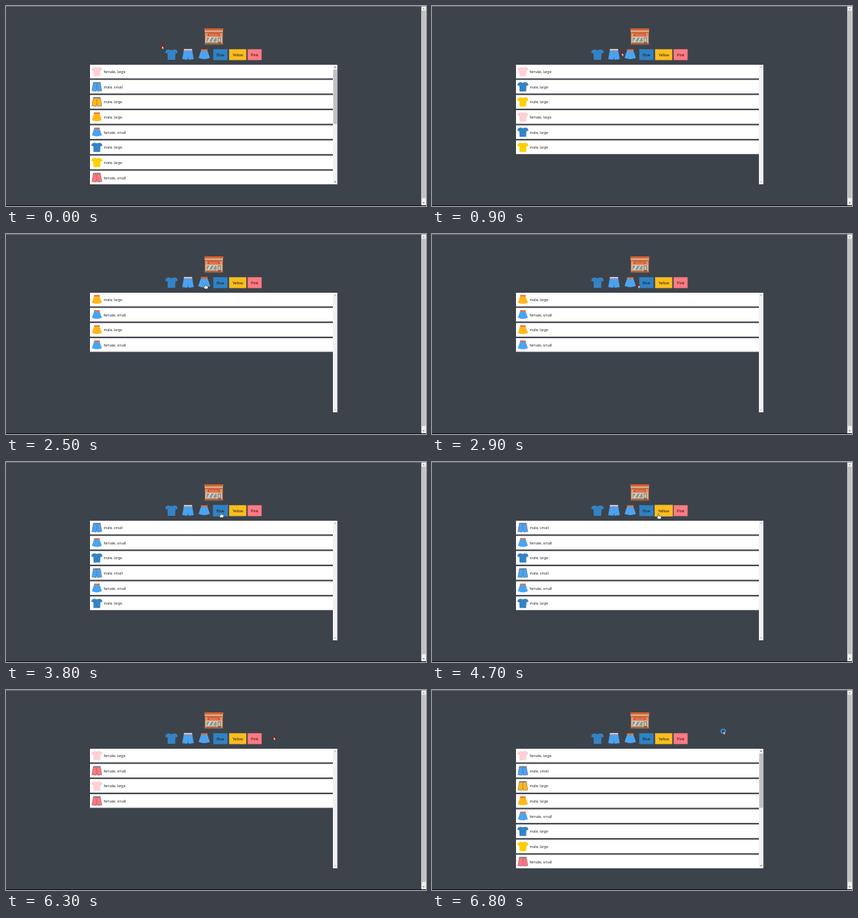
Animation of 600 by 286 pixels, one loop 6.9 s. Source, as an HTML page:

```html
<!DOCTYPE html>
<html lang="en">
<head>
<meta charset="utf-8">
<title>Clothes shop filter</title>
<style>
html, body { margin: 0; width: 100%; height: 100%; overflow: hidden; background: #3d434b; }
svg { display: block; width: 100vw; height: 100vh; }
.item { font: 5.2px "Open Sans", "Noto Sans", sans-serif; fill: #222; }
.label { font: 5.33px "Liberation Sans", Arial, sans-serif; fill: #1c1c1c; text-anchor: middle; }
</style>
</head>
<body>
<svg id="stage" viewBox="0 0 600 286"></svg>
<script>
const LOOP = 6900, STEP = 100, PITCH = 21.65;
const stage = document.getElementById('stage');

const rect = (x, y, w, h, fill, more = '') =>
  `<rect x="${x}" y="${y}" width="${w}" height="${h}" fill="${fill}" ${more}/>`;
const path = (d, fill, more = '') => `<path d="${d}" fill="${fill}" ${more}/>`;
const group = (id, body) => `<g id="${id}">${body}</g>`;
const triangle = (x, y, dir, fill) => path(`M${x - 1.4},${y + .8 * dir} h2.8 l-1.4,${-1.6 * dir}z`, fill);

// Garments, drawn around their own centre in a 16 x 14 box
const colors = {
  tee: { blue: '#3583c4', yellow: '#ffd000', pink: '#ffd0d5' },
  shorts: { blue: '#4ba3f0', yellow: '#fdb71f', pink: '#ff7680' },
  skirt: { blue: '#4ba5f2', yellow: '#ffb91c' }
};
const draw = {
  tee: c => path('M-3,-6.6 Q0,-4.8 3,-6.6 L6.2,-5.8 Q7.4,-5 8,-2.2 L5,-1.2 L4.7,6.7 H-4.7 L-5,-1.2 L-8,-2.2 Q-7.4,-5 -6.2,-5.8Z', c) +
    path('M-3,-6.4 Q0,-4.2 3,-6.4 M-5,-1.2 V-3 M5,-1.2 V-3', 'none', 'stroke="#00000022" stroke-width=".5"'),
  shorts: (c, plain) => {
    const line = plain ? '#4299e4' : '#4a4c56';
    return path('M-5,-6 H5 L7.1,5.8 L.9,6.5 L0,3.2 L-.9,6.5 L-7.1,5.8Z', c, `stroke="${line}" stroke-width=".45"`) +
      (plain ? rect(-5.2, -6.8, 10.4, 1.6, '#f6e6e0') + rect(-5.2, -5.4, 10.4, .5, '#d9705c')
        : rect(-5.2, -6.7, 10.4, 1.8, '#7b8089')) +
      path('M0,-4.8 V3', 'none', `stroke="${line}" stroke-width=".35"`);
  },
  skirt: c => path('M-4,-4.8 H4 L7.2,4.4 Q0,7.6 -7.2,4.4Z', c) +
    path('M-1.8,-4 L-3.2,5.4 M1.8,-4 L3.2,5.4', 'none', 'stroke="#00000014" stroke-width=".4"') +
    rect(-4.1, -6.5, 8.2, 1.9, '#e9692c')
};

const catalog = [
  ['tee', 'pink', 'female, large'],
  ['shorts', 'blue', 'male, small'],
  ['shorts', 'yellow', 'male, large'],
  ['skirt', 'yellow', 'male, large'],
  ['skirt', 'blue', 'female, small'],
  ['tee', 'blue', 'male, large'],
  ['tee', 'yellow', 'male, large'],
  ['shorts', 'pink', 'female, small']
];
const items = [...catalog, ...catalog];

// Filter in force from each time on
const filters = [[0, ''], [400, 'tee'], [1500, 'shorts'], [2400, 'skirt'],
  [3800, 'blue'], [4900, 'yellow'], [5900, 'pink'], [6600, '']];

// Controls: centre, size, and the time span of the hover
const controls = {
  tee: { x: 236.4, y: 69.4, hover: [200, 600] },
  shorts: { x: 260, y: 69.3, hover: [1000, 1900] },
  skirt: { x: 283.2, y: 69.2, hover: [2100, 2800] },
  blue: { x: 306.3, y: 69.6, w: 20.3, text: 'Blue', fill: '#3082c4', hover: [3100, 4500] },
  yellow: { x: 331, y: 69.6, w: 24.6, text: 'Yellow', fill: '#fbbd1f', hover: [4600, 5200] },
  pink: { x: 355.2, y: 69.6, w: 20, text: 'Pink', fill: '#ff7a82', hover: [5400, 6000] }
};

// Pointer: time, x, y of the tip
const track = [[0, 222.5, 57], [300, 237, 71], [500, 238, 71], [700, 256, 55], [900, 271, 67],
  [1100, 263, 71], [1600, 263, 71], [1900, 272, 70], [2200, 284, 71], [2600, 285, 71],
  [2900, 294.3, 73], [3300, 306, 72], [3600, 307, 72], [4200, 307, 72], [4700, 323.5, 74],
  [5000, 329, 73], [5500, 354, 72], [5900, 355, 72], [6100, 382, 67], [6300, 382, 67],
  [6600, 416, 59], [6900, 416, 59]];

const within = (t, [a, b]) => t >= a && t < b;
const lastBefore = (list, t) => list.filter(entry => entry[0] <= t).pop();

function pointerAt(t) {
  const i = Math.max(1, track.findIndex(p => p[0] > t));
  const [a, b] = [track[i - 1], track[i]];
  const k = (t - a[0]) / (b[0] - a[0]);
  return [a[1] + (b[1] - a[1]) * k, a[2] + (b[2] - a[2]) * k];
}

function shop() {
  return rect(283.4, 32, 27, 3.4, '#d8622f') + rect(283.8, 35.2, 26.2, 1.6, '#f2cfa8') +
    rect(284.2, 36.8, 25.4, 17, '#e39468') + rect(285, 37.4, 23.8, 1.5, '#b9603c') +
    rect(288, 39.4, 17.6, 3.8, '#d5502c') + rect(290, 41, 13.6, .7, '#f3c4a4') +
    rect(285.6, 44.2, 22.6, 8, '#f4dcc0') + rect(286.4, 45, 14.6, 6.4, '#8d9a92') +
    path('M287.4,51.4 l3.6,-6.4 h2.4 l-3.6,6.4z M293.6,51.4 l3.6,-6.4 h1.6 l-3.6,6.4z', '#d5dcd6') +
    rect(302.4, 44.8, 4.8, 9, '#7d5440') + rect(303.2, 45.6, 3.2, 6, '#b7c4bf') +
    rect(285.6, 52.2, 15.6, 1.6, '#b8683f') + rect(283.4, 53.8, 27, 1.5, '#8a6450');
}

function control([id, c]) {
  const body = c.text
    ? rect(-c.w / 2, -7.8, c.w, 15.6, c.fill) + `<text class="label" y="1.9">${c.text}</text>`
    : `<g transform="scale(1.13)">${draw[id](colors[id].blue, true)}</g>`;
  return group('nav-' + id, body);
}

function row([kind, color, text], i) {
  const y = 84 + i * PITCH;
  return rect(120, y, 347, 19.5, '#fff') +
    `<g transform="translate(129.8 ${y + 9.8})">${draw[kind](colors[kind][color])}</g>` +
    `<text class="item" x="139.4" y="${y + 12}">${text}</text>`;
}

function list(filter) {
  const shown = items.filter(item => !filter || item.includes(filter));
  const full = shown.length * PITCH > 171;
  const arrow = full ? '#505050' : '#a3a3a3';
  return `<g clip-path="url(#view)">${shown.map(row).join('')}</g>` +
    rect(467, 84, 6.4, 171, '#f1f1f1') +
    (full ? rect(467.5, 91, 5.4, 77.5, '#c1c1c1') : '') +
    triangle(470.2, 87.4, 1, arrow) + triangle(470.2, 251.5, -1, arrow);
}

const outline = 'stroke="#111" stroke-width=".5" stroke-linejoin="round"';
const arrow = '<g transform="translate(.3 .2) scale(.72)">' +
  path('M0,0 V6.2 L1.5,4.9 L2.5,7.1 L3.5,6.6 L2.5,4.5 H4.4Z', '#fff', outline) + '</g>';
const hand = path('M-.7,.4 Q0,-.5 .7,.4 V3 L3.4,3.5 Q4.2,3.8 4,5 L3.4,7.4 H-.7 L-2.7,4.8 Q-2.5,3.6 -.7,4.6Z', '#fff', outline);
const redDot = '<ellipse cx="-.4" cy="-.1" rx="2.3" ry="1.9" fill="#9c1c1c"/>';
const busyRing = '<circle r="3" fill="none" stroke="#3b93dc" stroke-width="1.7"/>';

function pointer(t, hovered) {
  const [x, y] = pointerAt(t);
  const shape = hovered ? hand : (t >= 6600 ? busyRing : redDot) + arrow;
  return `<g transform="translate(${x} ${y})">${shape}</g>`;
}

stage.innerHTML = '<clipPath id="view"><rect x="120" y="84" width="347" height="171"/></clipPath>' +
  rect(0, 0, 600, 286, '#3d434b') + rect(0, 0, 600, .7, '#85898e') +
  rect(593.3, .6, 6.7, 284.4, '#f1f1f1') + rect(593.8, 6.6, 5.8, 268, '#c1c1c1') +
  triangle(596.7, 3.8, 1, '#6a6a6a') + triangle(596.7, 281.5, -1, '#505050') +
  rect(0, 285, 600, 1, '#08090a') + shop() +
  Object.entries(controls).map(control).join('') + group('list', '') + group('pointer', '');

const listNode = document.getElementById('list');
const pointerNode = document.getElementById('pointer');
let shownFilter = null;

function render(t) {
  let hovered = false;
  for (const [id, c] of Object.entries(controls)) {
    const on = within(t, c.hover);
    hovered = hovered || on;
    document.getElementById('nav-' + id)
      .setAttribute('transform', `translate(${c.x} ${c.y}) scale(${on ? 1.06 : 1})`);
  }
  const filter = lastBefore(filters, t)[1];
  if (filter !== shownFilter) {
    shownFilter = filter;
    listNode.innerHTML = list(filter);
  }
  pointerNode.innerHTML = pointer(t, hovered);
}

const start = performance.now();
function tick() {
  const t = (performance.now() - start) % LOOP;
  render(Math.floor(t / STEP) * STEP);
  requestAnimationFrame(tick);
}
render(0);
requestAnimationFrame(tick);
</script>
</body>
</html>
```
